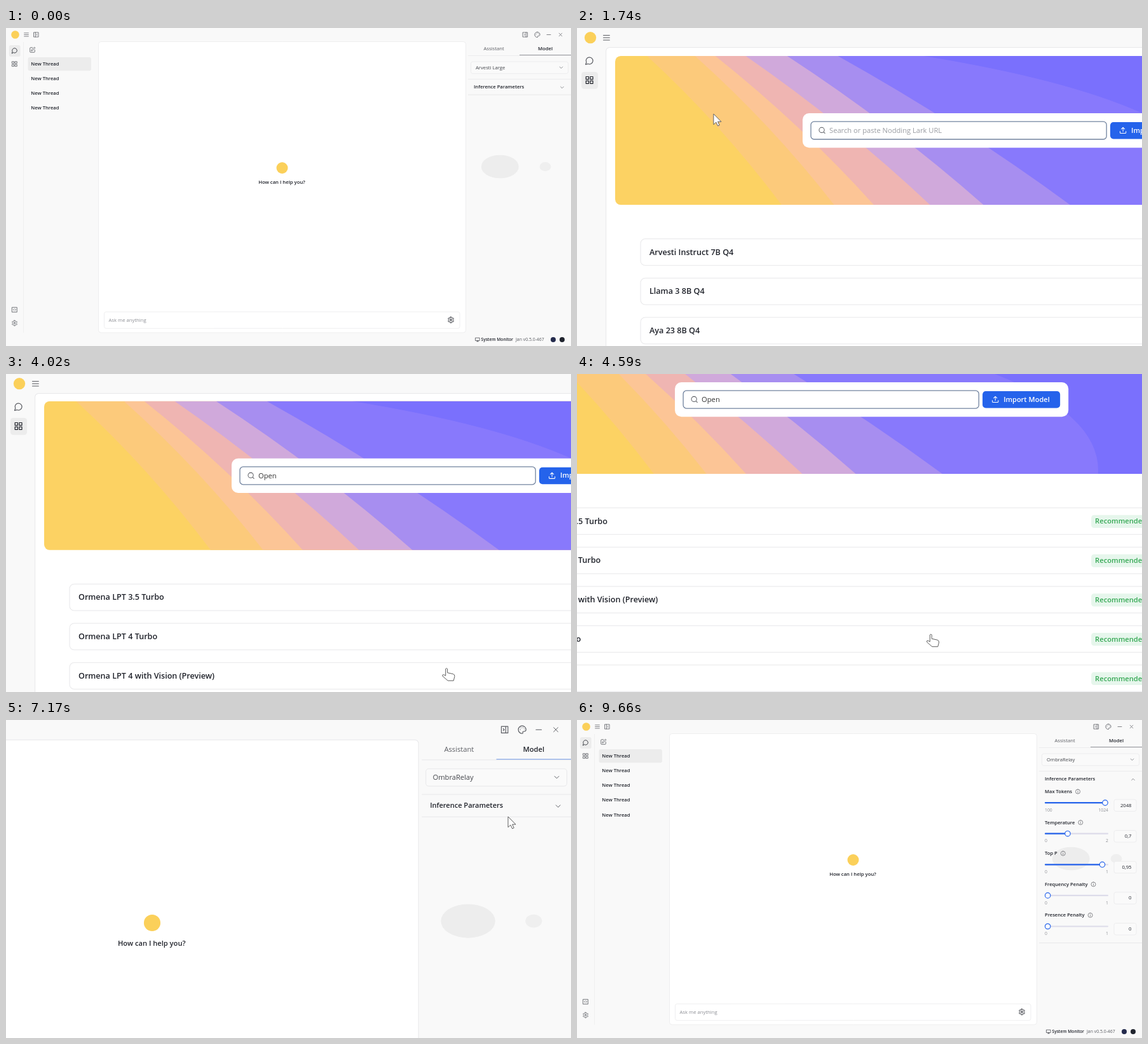
These frames come from a looping animation (889 px wide and 500 px high, 9.69 s). An HTML page with a canvas:

```html
<!DOCTYPE html>
<html lang="en">
<head>
<meta charset="utf-8">
<title>Chat app tour</title>
<style>
html, body { margin: 0; width: 100%; height: 100%; overflow: hidden; background: #f9f9f9; }
canvas { display: block; }
</style>
</head>
<body>
<canvas id="stage" width="889" height="500"></canvas>
<script>
const W = 889, H = 500, LOOP = 9690, ZOOM = 1.45;
const INK = '#20232b', GREY = '#5b5d63', PALE = '#8d8f95', LINE = '#e8e8ea', BLUE = '#2563eb', LOGO = '#fbd05a';
const ctx = document.getElementById('stage').getContext('2d');

// 24-unit line icons
const ICONS = {
  chat: 'M7.9 20A9 9 0 1 0 4 16.1L2 22Z',
  grid: 'M3 3h7v7H3zM14 3h7v7h-7zM14 14h7v7h-7zM3 14h7v7H3z',
  menu: 'M3 5h18M3 12h18M3 19h18',
  panelLeft: 'M3 3h18v18H3zM9 3v18M16 9l-3 3 3 3',
  panelRight: 'M3 3h18v18H3zM15 3v18M8 9l3 3-3 3',
  palette: 'M12 2a10 10 0 1 0 0 20c3 0 1-4 2-5s8 1 8-5c0-6-5-10-10-10M7 12h.1M9 7h.1M14 6.5h.1M18 10h.1',
  minus: 'M4 12h16',
  close: 'M5 5l14 14M19 5L5 19',
  edit: 'M12 3H5a2 2 0 0 0-2 2v14a2 2 0 0 0 2 2h14a2 2 0 0 0 2-2v-7M18.4 2.6a2.1 2.1 0 0 1 3 3L12 15l-4 1 1-4z',
  code: 'M3 3h18v18H3zM10 9l-3 3 3 3M14 9l3 3-3 3',
  gear: 'M12 9a3 3 0 1 0 0 6a3 3 0 1 0 0-6M10 2h4l.6 3 2 1.2 2.9-1 2 3.5-2.3 2v2.6l2.3 2-2 3.5-2.9-1-2 1.2-.6 3h-4l-.6-3-2-1.2-2.9 1-2-3.5 2.3-2v-2.6l-2.3-2 2-3.5 2.9 1 2-1.2z',
  search: 'M11 3a8 8 0 1 0 0 16a8 8 0 1 0 0-16M17 17l4 4',
  upload: 'M3 15v4a2 2 0 0 0 2 2h14a2 2 0 0 0 2-2v-4M7 8l5-5 5 5M12 3v12',
  monitor: 'M2 3h20v14H2zM8 21h8M12 17v4',
  info: 'M12 2a10 10 0 1 0 0 20a10 10 0 1 0 0-20M12 17v-5M12 8h.1',
  down: 'M5 9l7 7 7-7',
  up: 'M5 16l7-7 7 7'
};
for (const name in ICONS) ICONS[name] = new Path2D(ICONS[name]);

const CURSORS = {
  arrow: new Path2D('M0 0V11.5L2.7 9 4.6 13 6.4 12.2 4.6 8.4H8.3Z'),
  hand: new Path2D('M0 .8Q1.2-.6 2 .8V5L8 6.3Q10 6.8 9.8 9L8.6 13.6H2.4L-3.2 8.7Q-4 7-2.2 7L0 8.2Z'),
  beam: new Path2D('M-2.7-5.5H-.5L0-5 .5-5.5H2.7M0-5V5M-2.7 5.5H-.5L0 5 .5 5.5H2.7')
};

const clamp = v => Math.max(0, Math.min(1, v));
const ease = (t, from, to) => (1 - Math.cos(Math.PI * clamp((t - from) / (to - from)))) / 2;

function icon(name, x, y, size = 10, color = GREY, weight = 2) {
  ctx.save();
  ctx.translate(x - size / 2, y - size / 2);
  ctx.scale(size / 24, size / 24);
  ctx.lineWidth = weight;
  ctx.lineCap = ctx.lineJoin = 'round';
  ctx.strokeStyle = color;
  ctx.stroke(ICONS[name]);
  ctx.restore();
}

function text(str, x, y, { size = 7.7, color = INK, bold = false, align = 'left' } = {}) {
  ctx.font = `${bold ? 600 : 400} ${size}px "Open Sans", "Noto Sans", sans-serif`;
  ctx.textAlign = align;
  ctx.textBaseline = 'middle';
  ctx.fillStyle = color;
  ctx.fillText(str, x, y);
  return ctx.measureText(str).width;
}

function box(x, y, w, h, r, fill, stroke, weight = 0.7) {
  ctx.beginPath();
  ctx.roundRect(x, y, w, h, r);
  if (fill) { ctx.fillStyle = fill; ctx.fill(); }
  if (stroke) { ctx.strokeStyle = stroke; ctx.lineWidth = weight; ctx.stroke(); }
}

function oval(x, y, rx, ry, fill, stroke, weight = 1) {
  ctx.beginPath();
  ctx.ellipse(x, y, rx, ry, 0, 0, 7);
  ctx.fillStyle = fill;
  ctx.fill();
  if (stroke) { ctx.strokeStyle = stroke; ctx.lineWidth = weight; ctx.stroke(); }
}

const rule = (x, y, w, color = LINE, h = 0.8) => box(x, y - h / 2, w, h, 0, color);

function frameParts(page) {
  oval(14.5, 10.5, 6.3, 6.3, LOGO);
  icon('menu', 32, 10.5, 9);
  icon('palette', 836, 10.5);
  icon('minus', 854, 10.5, 9);
  icon('close', 872.5, 10.5, 8);
  const thread = page === 'thread';
  if (page !== 'hub') box(4.8, 27, 17.8, 18, 3, '#ececec');
  if (!thread) box(4.8, 47.6, 18, 18.4, 3, '#ececec');
  icon('chat', 13.5, 35.5, 10, thread ? INK : GREY);
  icon('grid', 13.5, 56.5, 10, thread ? GREY : INK);
  icon('code', 13.5, 443, 10);
  icon('gear', 13.5, 464, 10);
  icon('monitor', 742, 490, 7.5, INK);
  text('System Monitor', 747.5, 490, { size: 6.6, bold: true });
  text('Jan v0.5.0-467', 802, 490, { size: 6.9, color: GREY });
  oval(861, 490, 4, 4, '#242b4d');
  oval(875, 490, 4, 4, '#20242e');
}

const PARAMS = [
  ['Max Tokens', 831, '100', '1024', '2048'],
  ['Temperature', 772, '0', '2', '0,7'],
  ['Top P', 826.5, '0', '1', '0,95'],
  ['Frequency Penalty', 740.7, '0', '1', '0'],
  ['Presence Penalty', 740.7, '0', '1', '0']
];

function parameter([name, knob, low, high, value], i) {
  const y = 113 + 48.6 * i;
  const w = text(name, 736, y, { bold: true, size: 7.6 });
  icon('info', 736 + w + 9, y - 0.5, 8.5);
  box(736, y + 16, 100, 2.2, 1, '#dddcea');
  box(736, y + 16, knob - 736, 2.2, 1, BLUE);
  oval(knob, y + 17.1, 4.2, 4.2, '#fff', BLUE, 1.2);
  text(low, 736, y + 29, { size: 6.8, color: PALE });
  text(high, 836, y + 29, { size: 6.8, color: PALE, align: 'right' });
  box(845, y + 12, 35, 18.5, 3, '#fafafa', LINE);
  text(value, 872.5, y + 21.5, { align: 'right' });
}

function threadPage(t) {
  const later = t > 5000;
  frameParts('thread');
  icon('panelLeft', 47.5, 10.5, 9.5);
  icon('panelRight', 817, 10.5, 9.5);
  box(27.2, 22, 0.7, 457, 0, '#ececec');
  icon('edit', 41.5, 34.5, 10);
  box(34.5, 46, 99.5, 21.2, 3, '#ececec');
  for (let i = 0; i < (later ? 5 : 4); i++) text('New Thread', 39.3, 57 + 23.15 * i, { bold: true, size: 7.6 });

  box(145.5, 21.5, 578, 457.5, 4, '#fff', LINE);
  oval(434.5, 220, 9, 9, LOGO);
  text('How can I help you?', 434, 242.5, { bold: true, align: 'center' });
  box(154.5, 446.3, 559.5, 26, 3, '#fff', LINE);
  text('Ask me anything', 161.5, 460, { color: PALE });
  icon('gear', 700, 459, 11, INK);

  oval(777.3, 218, 29.5, 18.3, '#ededed');
  oval(848.5, 218, 9, 7.2, '#efefef');
  text('Assistant', 767.5, 32.5, { align: 'center', color: GREY });
  text('Model', 848.5, 32.5, { align: 'center', bold: true });
  rule(727, 43.3, 162);
  rule(808, 42.6, 81, later && t < 8850 ? '#6f97e6' : '#777a80', 0.8);
  box(731.5, 53, 153, 18.7, 3, '#fafafa', LINE);
  text(later ? 'OmbraRelay' : 'Arvesti Large', 739, 62.5, { color: '#44464c' });
  icon('down', 873.5, 62, 8);

  rule(727, 80.7, 162);
  const open = ease(t, 7420, 7620);
  text('Inference Parameters', 736, 93.5, { bold: true, size: 7.6 });
  icon(open > 0.5 ? 'up' : 'down', 875, 93.3, 8);
  const bottom = 105 + 245.5 * open;
  if (open) {
    ctx.save();
    ctx.beginPath();
    ctx.rect(727, 100, 162, bottom - 100);
    ctx.clip();
    PARAMS.forEach(parameter);
    ctx.restore();
  }
  rule(727, bottom, 162);
}

function loadingPage() {
  const soft = '#f6f6f6';
  oval(300, 139, 150, 25, soft);
  oval(570, 217, 95, 29, soft);
  oval(142, 295, 48, 21, soft);
  for (let i = 0; i < 5; i++) oval(162 + 65 * i, 222, 24, 15, '#f8f8f8');
  oval(259.5, 139.3, 23, 15.2, '#ececec');
  oval(520, 217, 21.3, 14.4, '#ececec');
  frameParts('loading');
}

// Hero colour bands: colour, left edge at the top, left edge at the bottom, bulge to the right
const BANDS = [
  ['#fcca7b', 76, 222, 8], ['#fcc596', 128, 279, 8], ['#efb5b2', 150, 322, 8], ['#d0a9db', 183, 383, 8],
  ['#a78ef0', 228, 441, 8], ['#8879fc', 283, 535, 8], ['#7a70fd', 376, 704, 170]
];

function hero() {
  const top = 30.3, bottom = 191.7, right = 876;
  ctx.save();
  ctx.beginPath();
  ctx.roundRect(41.4, top, right - 41.4, bottom - top, 6);
  ctx.clip();
  ctx.fillStyle = '#fcd263';
  ctx.fillRect(41, top, 836, 162);
  for (const [color, x1, x2, bulge] of BANDS) {
    ctx.beginPath();
    ctx.moveTo(x1, top);
    ctx.quadraticCurveTo((x1 + x2) / 2 + bulge, 106 - bulge / 8, x2, bottom);
    ctx.lineTo(right, bottom);
    ctx.lineTo(right, top);
    ctx.fillStyle = color;
    ctx.fill();
  }
  ctx.restore();
}

function searchCard(t) {
  const typed = 'Open'.slice(0, Math.max(0, Math.floor((t - 2560) / 140)));
  const focused = t > 2100 && t < 3450;
  box(244.8, 92.4, 427, 37.4, 7, '#fff');
  box(253.8, 101.5, 320.8, 19.2, 3.5, '#fff', focused ? '#2456bd' : '#71839f', focused ? 1.2 : 0.9);
  icon('search', 265.9, 111, 8.5);
  let caret = 273.4;
  if (typed) caret += text(typed, 273.8, 111.7, { color: '#333' });
  else text('Search or paste Nodding Lark URL', 273.8, 111.7, { color: '#9a9ca2' });
  if (focused && (t % 1000 < 520 || typed)) box(caret, 106, 0.7, 11, 0, INK);
  box(578.6, 102, 84.2, 18.3, 3.5, BLUE);
  icon('upload', 592.5, 111, 8.5, '#fff');
  text('Import Model', 601.4, 111.5, { color: '#fff', bold: true, size: 7.6 });
}

const ALL_MODELS = ['Arvesti Instruct 7B Q4', 'Llama 3 8B Q4', 'Aya 23 8B Q4'];
const FOUND_MODELS = ['Ormena LPT 3.5 Turbo', 'Ormena LPT 4 Turbo', 'Ormena LPT 4 with Vision (Preview)',
  'Ormena LPT 4o', 'OmbraRelay', 'Orchard Neural 7B Q4'];

function modelRow(name, i, t) {
  const y = 228.6 + 42.6 * i, mid = y + 14.7;
  box(69, y, 779.3, 28.8, 5, '#fff', LINE);
  text(name, 78.6, mid + 0.3, { bold: true, size: 8.7 });
  icon('down', 832.8, mid - 0.2, 9, INK, 2.4);
  if (i < 5) {
    const hovered = i === 4 && t > 4950;
    box(696.6, mid - 7, 64.2, 14, 3, '#e6f6ec');
    text('Recommended', 700.7, mid + 0.5, { color: '#34a853', bold: true, size: 7.7 });
    box(765.6, mid - 9.2, 56.6, 18.4, 3.5, '#fff', hovered ? '#4a4e5c' : '#5f7cc0', 0.65);
    text('Use', 793.9, mid + 0.5, { color: hovered ? '#242a4a' : '#2450b4', align: 'center' });
  } else {
    text('4.07GB', 630.3, mid + 0.5, { bold: true, size: 7.6, color: '#44464c' });
    box(665.5, mid - 7, 95.2, 14, 3, '#fef5e4');
    text('Slow on your device', 669.7, mid + 0.5, { color: '#d99a3c', bold: true, size: 7.8 });
    icon('info', 752.6, mid - 0.4, 8, '#d99a3c');
    box(766.2, mid - 9.2, 56, 18.4, 3.5, BLUE);
    text('Download', 794.2, mid + 0.5, { color: '#fff', bold: true, size: 7.8, align: 'center' });
  }
}

function hubPage(t) {
  frameParts('hub');
  box(31.5, 21, 854, 458, 4, '#fff', LINE);
  ctx.save();
  ctx.beginPath();
  ctx.rect(31.5, 21.4, 854, 457.2);
  ctx.clip();
  ctx.translate(0, -5.5 * ease(t, 3960, 4200));
  hero();
  searchCard(t);
  box(768.3, 200.7, 80, 18.6, 3.5, '#fff', LINE);
  text('All Models', 775.5, 210.8, { color: '#44464c', size: 7.9 });
  icon('down', 836.5, 210.5, 8);
  (t < 3150 ? ALL_MODELS : FOUND_MODELS).forEach((name, i) => modelRow(name, i, t));
  ctx.restore();
}

// Pointer waypoints: time, x, y
const TRACK = [
  [560, 75, 125], [1180, 14, 57], [1400, 14, 57], [1500, 42.8, 75.5], [2050, 304, 119.3], [3420, 304, 119.3],
  [3960, 476, 318], [4590, 521.5, 360], [5080, 790, 405.5], [6000, 790, 405.5], [6650, 832, 190],
  [7170, 820.7, 104.8], [7370, 866, 94], [7800, 866, 94], [8600, 800, 300]
];

function pointer(t) {
  const next = TRACK.findIndex(point => point[0] > t);
  if (next < 1) return;
  const [t0, x0, y0] = TRACK[next - 1], [t1, x1, y1] = TRACK[next];
  const k = ease(t, t0, t1);
  const inside = (from, to) => t > from && t < to;
  const shape = inside(1900, 3600) ? 'beam'
    : inside(1050, 1650) || inside(3800, 6050) || inside(7290, 7850) ? 'hand' : 'arrow';
  ctx.save();
  ctx.translate(x0 + (x1 - x0) * k, y0 + (y1 - y0) * k);
  ctx.lineJoin = 'round';
  ctx.lineWidth = 0.65;
  ctx.strokeStyle = shape === 'beam' ? '#222' : '#555';
  ctx.fillStyle = '#fff';
  if (shape !== 'beam') ctx.fill(CURSORS[shape]);
  ctx.stroke(CURSORS[shape]);
  ctx.restore();
}

function draw(t) {
  const scale = 1 + (ZOOM - 1) * (ease(t, 200, 1020) - ease(t, 7950, 8850));
  const panX = ease(t, 4230, 4950);
  const panY = panX - ease(t, 6030, 6900);
  ctx.setTransform(1, 0, 0, 1, 0, 0);
  ctx.fillStyle = '#f9f9f9';
  ctx.fillRect(0, 0, W, H);
  ctx.translate(-W * (scale - 1) * panX, -H * (scale - 1) * panY);
  ctx.scale(scale, scale);
  if (t < 1420 || t >= 5970) threadPage(t);
  else if (t < 1650) loadingPage();
  else hubPage(t);
  pointer(t);
}

function tick() {
  draw(performance.now() % LOOP);
  requestAnimationFrame(tick);
}
tick();
</script>
</body>
</html>
```
